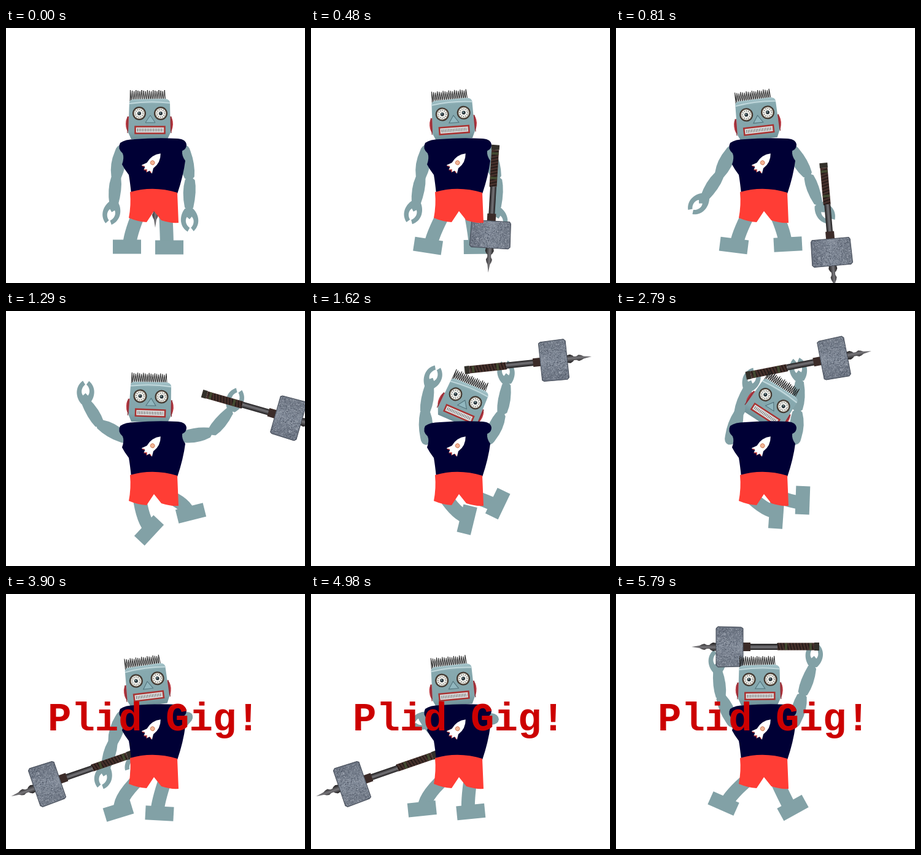
An HTML page for the animation above (5.82 s loop, 487x415 px).

```html
<!DOCTYPE html>
<html lang="en">
<head>
<meta charset="utf-8">
<title>Robot with hammer</title>
<style>
html, body { margin: 0; width: 100%; height: 100%; overflow: hidden; background: #fff; }
svg { display: block; width: 487px; height: 415px; }
.skin { fill: #82a1a6; }
.leg { fill: none; stroke: #82a1a6; stroke-width: 22; }
.title { font: bold 64px "Liberation Mono", monospace; fill: #c00; white-space: pre; }
</style>
</head>
<body>
<svg viewBox="0 0 487 415">
  <defs>
    <linearGradient id="face" x2="0" y2="1">
      <stop offset="0" stop-color="#a9c8ce"/><stop offset=".14" stop-color="#87a9af"/>
      <stop offset=".8" stop-color="#83a5ab"/><stop offset="1" stop-color="#6f9097"/>
    </linearGradient>
    <linearGradient id="steel" x2="0" y2="1">
      <stop offset="0" stop-color="#717986"/><stop offset=".5" stop-color="#808997"/><stop offset="1" stop-color="#69717f"/>
    </linearGradient>
    <linearGradient id="rod" x2="0" y2="1">
      <stop offset="0" stop-color="#1c1a1b"/><stop offset=".45" stop-color="#77767a"/><stop offset="1" stop-color="#1c1a1b"/>
    </linearGradient>
    <path id="arm" class="skin" d="M0-14Q-9-13-10-2Q-15 20-8 40Q0 48 8 40Q13 20 9-2Q8-13 0-14Z"/>
    <path id="fore" class="skin" d="M-8 0Q-13 20-7 45Q0 52 7 45Q12 18 8 0Q0-8-8 0Z"/>
    <path id="hand" class="skin" d="M-6-5C-15 4-19 22-5 33L-1 27C-7 22-8 14-4 9L0 13L4 9C8 14 7 22 1 27L5 33C19 22 15 4 6-5Z"/>
    <g id="eye">
      <circle r="11" fill="#40362f"/><circle r="9" fill="#b4aea0"/><circle r="8" fill="#f4f4ef"/>
      <circle r="6.2" fill="none" stroke="#555" stroke-width="2" stroke-dasharray="1 2.2"/>
      <circle r="3" fill="#27333a"/><circle r="1" cx="-.6" cy="-.8" fill="#9bb"/>
    </g>
  </defs>

  <g id="limbs"></g>

  <g id="hammer">
    <rect x="-146" y="-6" width="8" height="13" fill="#33302a"/>
    <rect x="-138" y="-5.500" width="60" height="12" fill="#46302b"/>
    <path id="wrap" fill="none" stroke="#241b19" stroke-width="1.800"/>
    <path d="M-132-5v11M-92-5v11" stroke="#434a30" stroke-width="4"/>
    <rect x="-78" y="-5" width="48" height="10" fill="url(#rod)"/>
    <rect x="-34" y="-7" width="12" height="14" fill="#3b2b28"/>
    <path d="M21-6L27-7L31-5L33-3L37-3L41-5L45-4L49-2L62 0L49 2L45 4L41 5L37 3L33 3L31 5L27 7L21 6Z" fill="url(#rod)"/>
    <path d="M-22-30L-19-32L19-33L22-30L22 30L19 33L-19 32L-22 30Z" fill="url(#steel)" stroke="#434a56"/>
    <path id="grain" fill="none" stroke="#4b5361" stroke-width="1"/>
    <path id="shine" fill="none" stroke="#a7aeb9" stroke-width="1"/>
  </g>

  <g id="head">
    <path id="hair" fill="none" stroke="#222" stroke-width="1"/>
    <path d="M201 143Q195 145 195 156Q195 167 201 170ZM267 143Q272 146 272 157Q271 168 267 170Z" fill="#bd3a43"/>
    <path d="M198 144v27M269 144v27" stroke="#7d2b33" stroke-width="1.200"/>
    <path d="M201 120Q203 116 209 116L259 115Q266 116 267 121L268 170L263 181L204 181L199 170Z" fill="url(#face)"/>
    <path d="M201 123Q234 118 267 122" fill="none" stroke="#c2d9dd" stroke-width="2"/>
    <use href="#eye" x="217" y="139"/><use href="#eye" x="252" y="139"/>
    <path d="M235 142L227 154L243 154Z" fill="#91b7bf" stroke="#4f7079"/>
    <rect x="210.500" y="160.500" width="48" height="11" fill="#ddd" stroke="#a93231" stroke-width="2.500"/>
    <path d="M214 166H256" stroke="#eee" stroke-width="5"/>
    <path d="M214 166H256" stroke="#555" stroke-width="5" stroke-dasharray="1 1.6"/>
  </g>

  <path d="M186 187Q194 181 210 181Q245 178 280 180Q293 181 294 190Q294 197 287 200Q286 208 292 216Q289 240 279 270L204 270Q202 250 200 239Q193 230 189 222Q193 211 190 204Q181 196 186 187Z" fill="#000035"/>
  <path d="M202 267Q240 256 279 268L281 317Q268 318 253 313L241 298L229 316Q214 315 200 309Q204 288 202 267Z" fill="#ff3d35"/>
  <g transform="translate(238 220) rotate(41)">
    <path d="M0-21Q10-10 7 5L11 13L5 12L3 17L0 13L-3 17L-5 12L-11 14L-7 5Q-10-10 0-21Z" fill="#fff"/>
    <circle cy="-1" r="3.300" fill="#f2b596" stroke="#cf8060"/>
    <path d="M-9 14L-6 12M9 13L6 12M-3 17L0 14L3 17" fill="none" stroke="#e0483c" stroke-width="1.200"/>
  </g>
  <text id="title" class="title" x="68" y="222">Plid Gig!</text>
</svg>
<script>
const LOOP = 5820, STEP = 30;
const $ = id => document.getElementById(id);

function make(tag, attrs) {
  const el = document.createElementNS("http://www.w3.org/2000/svg", tag);
  for (const k in attrs) el.setAttribute(k, attrs[k]);
  return $("limbs").appendChild(el);
}

// Jointed arm hung from a shoulder; angles run from straight down
function makeArm(x, y, upper, lower) {
  const parts = ["arm", "fore", "hand"].map(n => make("use", { href: "#" + n }));
  const sizes = [upper, lower, 0];
  return angles => {
    let px = x, py = y;
    parts.forEach((part, i) => {
      const a = angles[i] * Math.PI / 180;
      part.setAttribute("transform", `translate(${px} ${py}) rotate(${angles[i]})`);
      px -= sizes[i] * Math.sin(a);
      py += sizes[i] * Math.cos(a);
    });
  };
}

// Leg bends from hip to ankle; the ankle sits off the middle of the foot
function makeLeg(x, y, ankle) {
  const leg = make("path", { class: "leg" });
  const foot = make("rect", { class: "skin", x: -23, y: -11.5, width: 46, height: 23 });
  return ([fx, fy, deg]) => {
    const a = deg * Math.PI / 180, c = Math.cos(a), s = Math.sin(a);
    const ax = fx + ankle * c, ay = fy + ankle * s;
    leg.setAttribute("d", `M${x} ${y}Q${ax + 18 * s} ${ay - 18 * c} ${ax} ${ay}`);
    foot.setAttribute("transform", `translate(${fx} ${fy}) rotate(${deg})`);
  };
}

const leftLeg = makeLeg(217, 300, 4), rightLeg = makeLeg(260, 300, -4);
const leftArm = makeArm(187, 204, 40, 44), rightArm = makeArm(292, 204, 44, 51);

// Fine detail: hair coil, grip wrapping, stone grain
let d = "M202 119";
for (let i = 0; i < 19; i++) d += `L${202.5 + i * 3.1} ${101 + i % 3}L${204 + i * 3.1} 118`;
$("hair").setAttribute("d", d);
d = "";
for (let x = -136; x < -79; x += 5) d += `M${x} -5l3 11`;
$("wrap").setAttribute("d", d);
let seed = 7;
const rnd = () => (seed = seed * 16807 % 2147483647) / 2147483647;
for (const id of ["grain", "shine"]) {
  d = "";
  for (let i = 0; i < 320; i++) d += `M${(rnd() * 42 - 21).toFixed(1)} ${(rnd() * 62 - 31).toFixed(1)}h1`;
  $(id).setAttribute("d", d);
}

// Pose: head | left arm | right arm | left foot | right foot | hammer x, y, angle
const stand = [0, 11, 5, 15, -10, 2, -5, 197, 356, 0, 266, 357, 0, 243, 263, 90];
const step = [-6.5, 28, 33, 45, -30, -20, -40, 192, 354, 7, 280, 352, -3, 351, 365, 85];
const lift = [2, 120, 148, 182, -99, -140, -160, 233, 357, -47, 301, 329, -14, 460, 174, 16];
const raised = [33, 199, 200, 203, -175, -176, -190, 261, 331, -86, 304, 308, -88, 355, 77, -11];
const high = [...raised.slice(0, 14), 51, -11];
const smash = [-7, 19, 16, 14, 50, 50, 40, 183, 353, -17, 250, 357, 3, 50, 354, 143];
const rest = [...smash.slice(0, 13), 67, 309, 161];
const cheer = [-0.5, -204, -187, -182, 196, 200, 185, 175, 341, 24, 288, 348, -29, 185, 86, 180];

const keys = [[0, stand], [810, step], [1290, lift], [1860, high], [1980, raised]];
const clamp = v => Math.max(0, Math.min(1, v));
const mix = (a, b, u) => a.map((v, i) => v + (b[i] - v) * u);

function spline(t) {
  let k = 0;
  while (k < keys.length - 2 && t >= keys[k + 1][0]) k++;
  const [t0, a] = keys[k], [t1, b] = keys[k + 1];
  const span = t1 - t0, u = clamp((t - t0) / span);
  const slope = (n, i) => n < 1 || n > 2 ? 0 :
    (keys[n + 1][1][i] - keys[n - 1][1][i]) / (keys[n + 1][0] - keys[n - 1][0]);
  const ease = u * u * (3 - 2 * u);
  return a.map((v, i) => v + (b[i] - v) * ease +
    span * u * (1 - u) * (slope(k, i) * (1 - u) - slope(k + 1, i) * u));
}

function poseAt(t) {
  if (t <= 3000) return spline(t);
  if (t < 3900) return mix(raised, smash, clamp((t - 3000) / 90));
  const u = 1 - (1 - clamp((t - 4950) / 300)) ** 3;
  const body = mix(rest, cheer, u).slice(0, 13);
  const tool = mix(rest, cheer, clamp((t - 5610) / 180)).slice(13);
  return [...body, ...tool];
}

function draw(t) {
  const p = poseAt(t);
  $("head").setAttribute("transform", `rotate(${p[0]} 235 182)`);
  leftArm(p.slice(1, 4));
  rightArm(p.slice(4, 7));
  leftLeg(p.slice(7, 10));
  rightLeg(p.slice(10, 13));
  $("hammer").setAttribute("transform", `translate(${p[13]} ${p[14]}) rotate(${p[15]})`);
  $("title").style.display = t >= 3900 ? "" : "none";
}

const start = performance.now();
function tick() {
  const t = (performance.now() - start) % LOOP;
  draw(Math.floor(t / STEP) * STEP);
  requestAnimationFrame(tick);
}
tick();
</script>
</body>
</html>
```
